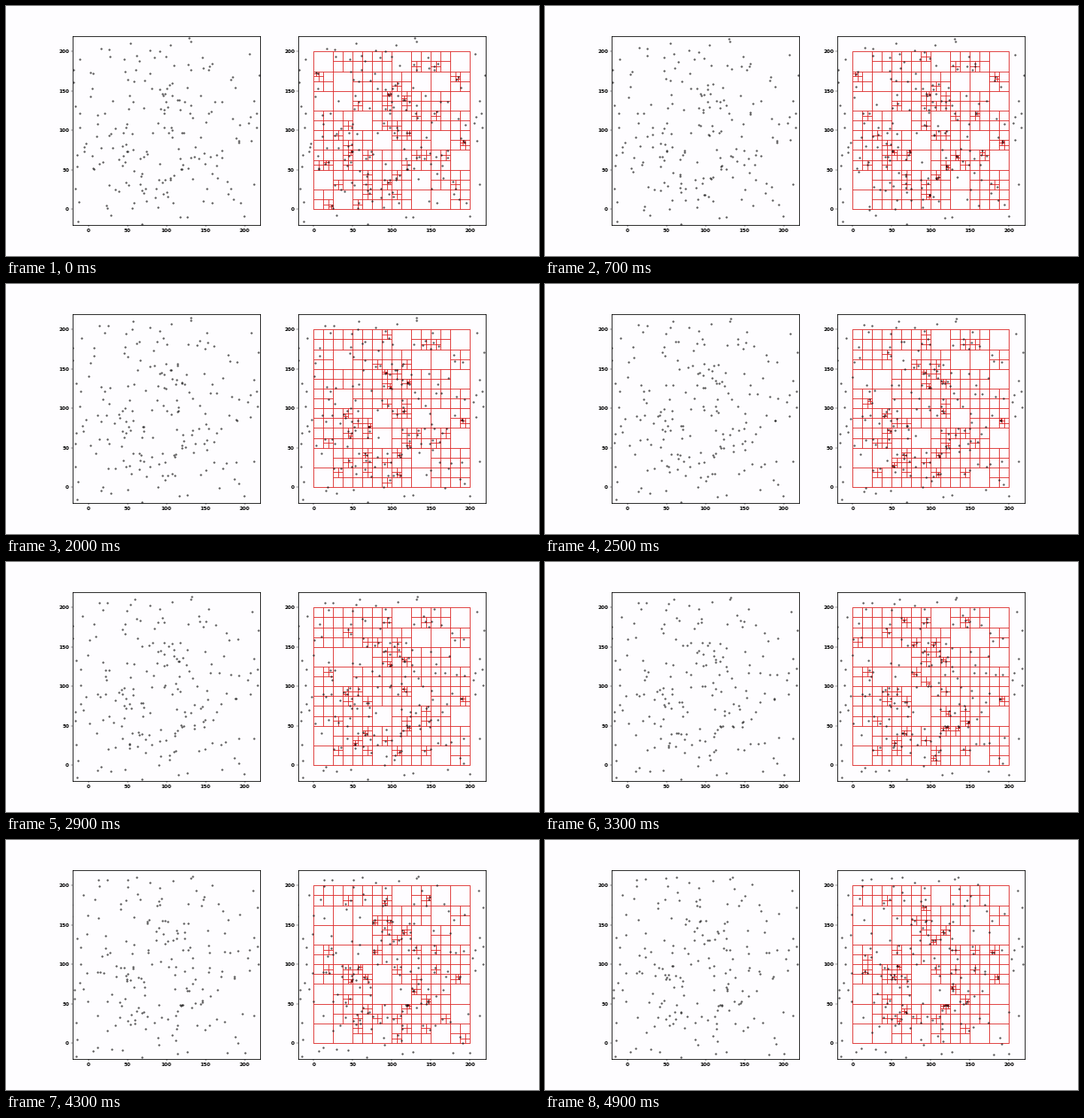
A matplotlib script for the animation above (5000 ms loop, 600x282 px).

```python
import numpy as np
import matplotlib.pyplot as plt
from matplotlib.animation import FuncAnimation
from matplotlib.collections import LineCollection

FRAMES, INTERVAL = 50, 100
SIZE, MARGIN, MAX_DEPTH = 200, 20, 7
INNER_COUNT, OUTER_COUNT = 165, 36
BACKGROUND, TREE_COLOR = "#fefdff", "#dc2424"

rng = np.random.default_rng(7)


def border_points(count):
    """Scatter points over the frame between the tree and the axes."""
    points = rng.uniform(-MARGIN, SIZE + MARGIN, (8 * count, 2))
    outside = ((points < 0) | (points > SIZE)).any(axis=1)
    return points[outside][:count]


outer = border_points(OUTER_COUNT)
inner = SIZE * rng.beta(1.25, 1.25, (INNER_COUNT, 2))
start = np.vstack([outer, inner])
velocity = np.vstack([
    rng.normal(0, 0.07, outer.shape),
    rng.normal(0, 0.24, inner.shape),
])


def tree_lines(points, x=0.0, y=0.0, size=SIZE, depth=0):
    """Return the dividing crosses of a quadtree with one point per leaf."""
    inside = ((points >= (x, y)) & (points < (x + size, y + size))).all(axis=1)
    points = points[inside]
    if len(points) <= 1 or depth == MAX_DEPTH:
        return []
    half = size / 2
    lines = [[(x + half, y), (x + half, y + size)],
             [(x, y + half), (x + size, y + half)]]
    for dx in (0, half):
        for dy in (0, half):
            lines += tree_lines(points, x + dx, y + dy, half, depth + 1)
    return lines


fig = plt.figure(figsize=(15, 7.05), dpi=40, facecolor=BACKGROUND)


def make_panel(left):
    ax = fig.add_axes([left / 600, 35.1 / 282, 211 / 600, 213.3 / 282],
                      facecolor=BACKGROUND)
    ticks = range(0, SIZE + 1, 50)
    limits = (-MARGIN, SIZE + MARGIN)
    ax.set(xlim=limits, ylim=limits, xticks=ticks, yticks=ticks)
    ax.spines[:].set_linewidth(1.4)
    for label in ax.get_xticklabels() + ax.get_yticklabels():
        label.set(fontsize=10.3, fontweight="bold")
    dots = ax.scatter(start[:, 0], start[:, 1], s=17, color="#111111",
                      alpha=0.72, linewidths=0, zorder=3)
    dots.set_snap(False)
    return ax, dots


_, left_dots = make_panel(75.1)
tree_ax, right_dots = make_panel(328.9)
outline = [(0, 0), (SIZE, 0), (SIZE, SIZE), (0, SIZE), (0, 0)]
tree = LineCollection([outline], colors=TREE_COLOR, linewidths=1.45, zorder=2)
tree_ax.add_collection(tree, autolim=False)


def update(frame):
    points = start + velocity * frame
    left_dots.set_offsets(points)
    right_dots.set_offsets(points)
    tree.set_segments([outline] + tree_lines(points))
    return left_dots, right_dots, tree


anim = FuncAnimation(fig, update, frames=FRAMES, interval=INTERVAL,
                     repeat=True, repeat_delay=0)
plt.show()
```
